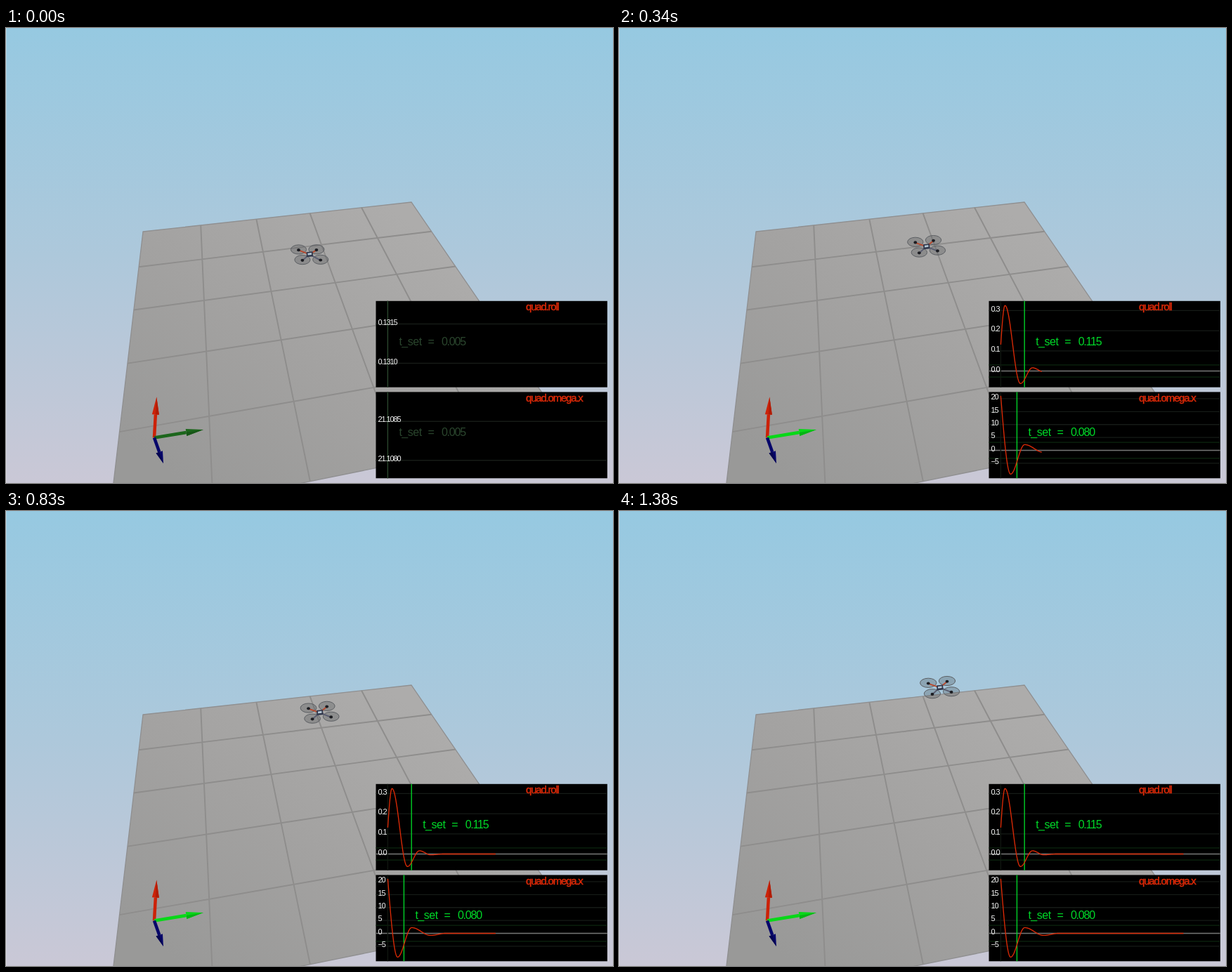
Animation of 864 by 648 pixels, one loop 1450 ms. Source, as an HTML page:

```html
<!DOCTYPE html>
<html lang="en">
<head>
<meta charset="utf-8">
<title>Quadrotor attitude step response</title>
<style>
  html, body { margin: 0; width: 100%; height: 100%; overflow: hidden; background: #b4c8da; }
  svg { display: block; width: 864px; height: 648px; }
  text { font-family: "Liberation Sans", Arial, sans-serif; }
  .tick { font-size: 11px; letter-spacing: -1.1px; fill: #f4f4f4; }
  .title { font-size: 15px; letter-spacing: -1.2px; fill: #e02a08; stroke: #e02a08; stroke-width: .4; }
  .set { font-family: Roboto, "Liberation Sans", sans-serif; font-size: 16px; letter-spacing: -1.2px; }
  .set .name { letter-spacing: -.5px; }
</style>
</head>
<body>
<svg viewBox="0 0 864 648" xmlns="http://www.w3.org/2000/svg">
  <defs>
    <linearGradient id="sky" x1="0" y1="0" x2="0" y2="1">
      <stop offset="0" stop-color="#96c9e1"/>
      <stop offset=".5" stop-color="#adc8db"/>
      <stop offset="1" stop-color="#cac8d6"/>
    </linearGradient>
    <linearGradient id="floorTone" gradientUnits="userSpaceOnUse" x1="540" y1="250" x2="240" y2="640">
      <stop offset="0" stop-color="#adacab"/>
      <stop offset=".5" stop-color="#a3a2a1"/>
      <stop offset="1" stop-color="#999998"/>
    </linearGradient>
  </defs>
  <rect width="864" height="648" fill="url(#sky)"/>
  <path d="M.5 0V648" stroke="#fff" stroke-opacity=".3"/>
  <g id="floor"></g>
  <g id="axes"></g>
  <g id="drone"></g>
  <g id="charts"></g>
</svg>
<script>
const $ = id => document.getElementById(id);
const linear = u => u;
const easeOut = u => Math.sin(u * Math.PI / 2);
const easeInOut = u => (1 - Math.cos(u * Math.PI)) / 2;

// Eased value through [x, y] keys; the first span may use its own easing
function through(keys, ease, first = ease) {
  return x => {
    const i = keys.findIndex(k => k[0] > x);
    if (i < 0) return keys[keys.length - 1][1];
    if (i === 0) return keys[0][1];
    const [x0, y0] = keys[i - 1], [x1, y1] = keys[i];
    return y0 + (y1 - y0) * (i === 1 ? first : ease)((x - x0) / (x1 - x0));
  };
}

// Perspective map of the unit square onto four corners
function project([x0, y0], [x1, y1], [x2, y2], [x3, y3]) {
  const ax = x1 - x2, ay = y1 - y2, bx = x3 - x2, by = y3 - y2;
  const sx = x0 - x1 + x2 - x3, sy = y0 - y1 + y2 - y3;
  const det = ax * by - bx * ay;
  const g = (sx * by - bx * sy) / det, h = (ax * sy - sx * ay) / det;
  return (u, v) => {
    const w = 1 + g * u + h * v;
    return [
      (x0 + (x1 * (1 + g) - x0) * u + (x3 * (1 + h) - x0) * v) / w,
      (y0 + (y1 * (1 + g) - y0) * u + (y3 * (1 + h) - y0) * v) / w
    ];
  };
}

function floor() {
  const corners = [[195, 290], [577, 248], [798.5, 571.3], [146.4, 704]];
  const at = project(...corners);
  let grid = "";
  for (let i = 1; i < 5; i++) {
    const k = i / 5;
    grid += `M${at(k, 0)}L${at(k, 1)}M${at(0, k)}L${at(1, k)}`;
  }
  return `<path d="M${corners.join("L")}Z" fill="url(#floorTone)" stroke="#8f8f90" stroke-width="1.3"/>` +
    `<path d="${grid}" fill="none" stroke="#8e8d8c" stroke-width="1.9"/>`;
}

// Each step lasts 70 ms, except two pauses of 130 ms
const LOOP = 1450, STEPS = 19;
const starts = [];
for (let i = 0, t = 0; i < STEPS; i++) {
  starts.push(t);
  t += i === 0 || i === 11 ? 130 : 70;
}

// Simulated seconds at each step, and the two damped responses
const simTime = through([[0, 0], [2, .1], [6, .28], [9, .4], [11, .5], [14, .655], [18, .847]], linear);
const roll = through([[0, .131], [.0195, .325], [.091, -.062], [.147, .016], [.199, -.004], [.26, 0]], easeInOut, easeOut);
const omega = through([[0, 21.108], [.0455, -9.2], [.111, 2.2], [.199, -.8], [.267, 0]], easeInOut, easeOut);

const LEFT = 526.5, RIGHT = 855.9, HEIGHT = 122.85;
const DT = .005;
const timeX = t => 543.4 + t * 307;

const axis = (v0, y0, k, ticks, digits) => ({ at: v => y0 - (v - v0) * k, ticks, digits });
const rollAxes = [
  axis(.131, 477.5, 112000, [.131, .1315], 4),
  axis(.131, 506, 572, [.15, .2, .25, .3], 2),
  axis(0, 488.5, 287, [0, .1, .2, .3], 1)
];
const omegaAxes = [
  axis(21.108, 615.7, 111000, [21.108, 21.1085], 4),
  axis(0, 601.5, 3.68, [-5, 0, 5, 10, 15, 20], 0)
];

const line = (d, color) => `<path d="${d}" fill="none" stroke="${color}" stroke-width="1.35"/>`;

function chart(top, title, signal, ax, band, limit, t, green) {
  const bottom = top + HEIGHT;
  const settle = Math.min(Math.round(t / DT) * DT + DT, limit);
  const x = timeX(settle - DT);
  const level = (v, color) => {
    const y = ax.at(v);
    return y > top && y < bottom ? line(`M${LEFT} ${y}H${RIGHT}`, color) : "";
  };
  let s = `<rect x="${LEFT}" y="${top}" width="${RIGHT - LEFT}" height="${HEIGHT}"/>`;
  s += ax.ticks.map(v => level(v, "#161b17")).join("");
  s += level(-band, "#0c260f") + level(band, "#0c260f") + level(0, "#747474");
  s += line(`M${timeX(0)} ${top}V${bottom}`, "#101610") + line(`M${x} ${top}V${bottom}`, green);

  const pts = [];
  for (let k = 0; k < t; k += .002) pts.push([timeX(k), ax.at(signal(k))]);
  pts.push([timeX(t), ax.at(signal(t))]);
  if (t > 0) s += line("M" + pts.join("L"), "#dc2a06");

  for (const v of ax.ticks) {
    const label = v.toFixed(ax.digits).replace("-", "\u2212");
    s += `<text class="tick" x="529.5" y="${ax.at(v) + 1.2}">${label}</text>`;
  }
  const y = top + 63;
  s += `<g class="set" fill="${green}"><text class="name" x="${x + 16}" y="${y}">t_set</text>` +
    `<text x="${x + 57}" y="${y}">=</text><text x="${x + 76.5}" y="${y}">${settle.toFixed(3)}</text></g>`;
  return s + `<text class="title" x="740" y="${top + 13.5}">${title}</text>`;
}

function arrow(dx, dy, neck, color, dark) {
  const len = Math.hypot(dx, dy), nx = dx * neck, ny = dy * neck;
  const sx = -dy / len * 5, sy = dx / len * 5;
  return `<path d="M0 0L${nx} ${ny}" stroke="${color}" stroke-width="4.5"/>` +
    `<path d="M${nx - sx} ${ny - sy}L${nx + sx} ${ny + sy}L${dx} ${dy}Z" fill="${color}"/>` +
    `<path d="M${nx} ${ny}L${nx + sx} ${ny + sy}L${dx} ${dy}Z" fill="${dark}"/>`;
}

function axes(bright) {
  const [g, dark] = bright ? ["#08d818", "#06b414"] : ["#1c661c", "#175617"];
  return `<g transform="translate(211 583.5)">` + arrow(3.3, -58, .57, "#cc2208", "#b01c06") +
    arrow(70, -11.5, .65, g, dark) + arrow(13, 36.5, .56, "#06066a", "#040450") + `</g>`;
}

function drone(t) {
  const size = .97 + .06 * t, tilt = roll(t);
  const hubs = [[-16, -6.5, -4], [10.2, -9.2, 15], [-10.4, 8.6, -4], [16.2, 5.7, 15]]
    .map(([x, y, lift]) => [x * size, y * size + lift * tilt]);
  let s = `<g transform="translate(${432 + 29 * t} ${322.3 - 51.5 * t - 38 * t * t})">`;
  for (const [x, y] of hubs) {
    s += `<ellipse cx="${x}" cy="${y}" rx="${11.4 * size}" ry="6.6" fill="#45484c" fill-opacity=".28" stroke="#5c5f63"/>`;
  }
  hubs.forEach(([x, y], n) => {
    s += `<path d="M0 0L${x} ${y + 1}" stroke="${n < 2 ? "#b8492e" : "#5a5d70"}" stroke-width="1.9"/>` +
      `<ellipse cx="${x}" cy="${y + .7}" rx="2.4" ry="2.1" fill="#1c1d22"/>`;
  });
  return s + `<path d="M-4.5 -3L4.5 -4L5 3L-4 4Z" fill="#30364a"/>` +
    `<path d="M-2.6 -1.5L2.8 -2.2L3 .6L-2.4 1.3Z" fill="#b4c6d4"/></g>`;
}

function draw(i) {
  const t = simTime(i), bright = i > 3;
  const green = bright ? "#00d828" : i ? "#22722e" : "#2a452d";
  $("axes").innerHTML = axes(bright);
  $("drone").innerHTML = drone(t);
  $("charts").innerHTML =
    chart(388.8, "quad.roll", roll, rollAxes[Math.min(i, 2)], .03, .115, t, green) +
    chart(518.4, "quad.omega.x", omega, omegaAxes[Math.min(i, 1)], 3.1, .08, t, green);
}

$("floor").innerHTML = floor();
let shown = -1;
const begin = performance.now();
function tick() {
  const t = (performance.now() - begin) % LOOP;
  let i = STEPS - 1;
  while (starts[i] > t) i--;
  if (i !== shown) draw(shown = i);
  requestAnimationFrame(tick);
}
tick();
</script>
</body>
</html>
```
